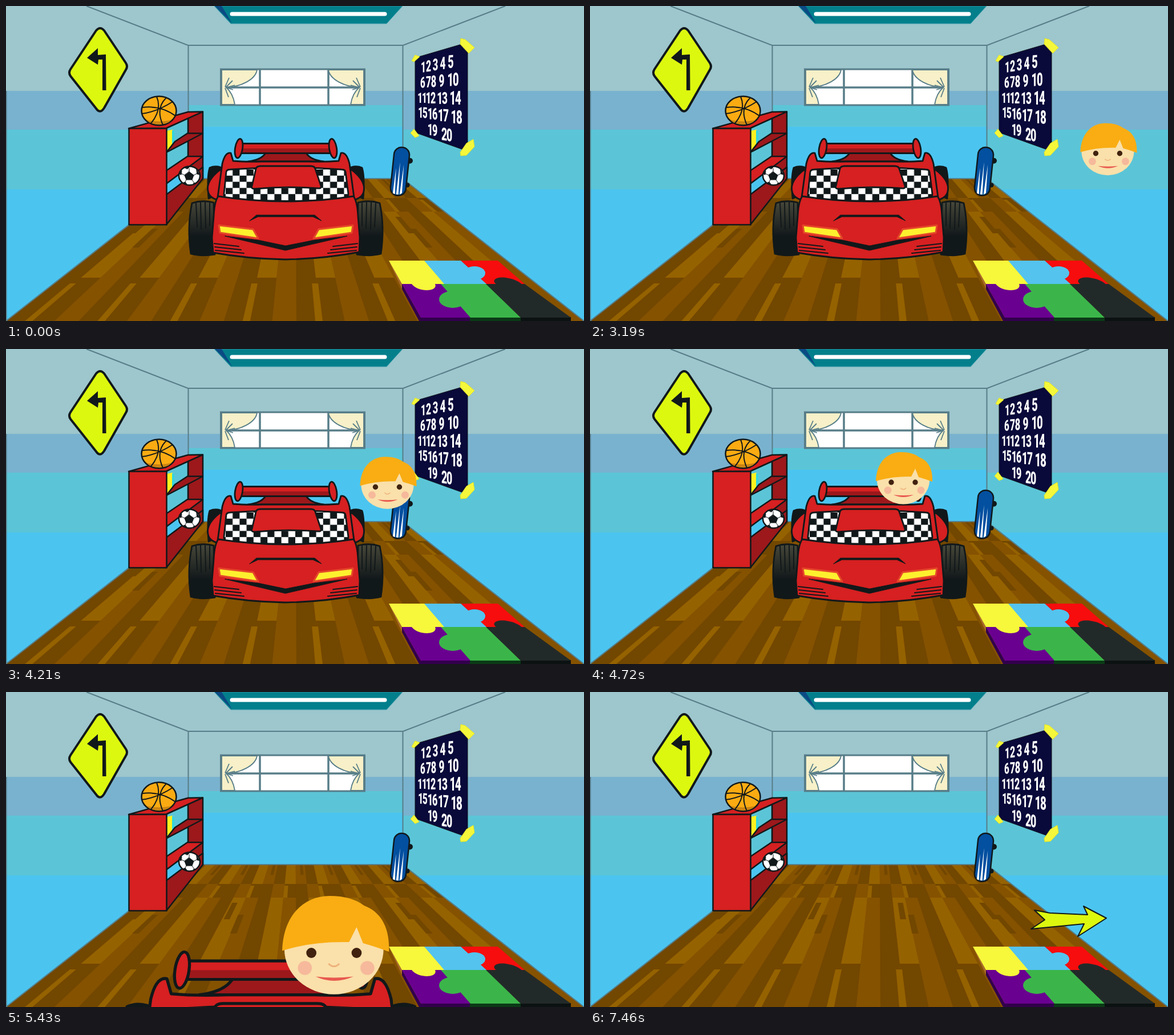
An HTML page for the animation above (8260 ms loop, 1013 px wide and 553 px high).

```html
<!DOCTYPE html>
<html lang="en">
<head>
<meta charset="utf-8">
<title>Garage</title>
<style>
  html, body { margin: 0; width: 100%; height: 100%; overflow: hidden; background: #4bc5f0; }
  svg { display: block; width: 1013px; height: 553px; }
  .ink { stroke: #11181a; stroke-width: 2.5; stroke-linejoin: round; stroke-linecap: round; }
  .edge { fill: none; stroke: #577d88; stroke-width: 2; }
  .none { fill: none; }
  .red { fill: #d62021; }
  .dark { fill: #9c181b; }
  #car { stroke-width: 2.8; }
  #nums { font: 900 31px Roboto, "Liberation Sans", sans-serif; fill: #fff; text-anchor: middle; letter-spacing: -2px; }
</style>
</head>
<body>
<svg viewBox="0 0 1013 553">
  <defs>
    <clipPath id="floorClip"><path d="M0 553L319 303H696L1013 553Z"/></clipPath>
    <pattern id="check" width="24.4" height="21.600" x="385" y="287" patternUnits="userSpaceOnUse">
      <path fill="#fff" d="M0 0h25v22H0z"/>
      <path fill="#11181a" d="M12.200 0h12.200v10.800H12.200zM0 10.800h12.200v10.800H0z"/>
    </pattern>
    <linearGradient id="tyre" x2="0" y2="1">
      <stop offset="0" stop-color="#48483a"/><stop offset=".65" stop-color="#11181a"/>
    </linearGradient>
  </defs>

  <!-- walls -->
  <path fill="#9dc6cd" d="M0 0h1013v149H0z"/>
  <path fill="#79b2cf" d="M0 149h1013v68H0z"/>
  <path fill="#5bc5d7" d="M0 217h1013v105H0zM319 174h377v43H319z"/>
  <path fill="#4bc5f0" d="M0 322h1013v231H0zM319 212h377v110H319z"/>
  <g id="floor" clip-path="url(#floorClip)"><path fill="#855200" d="M0 303h1013v250H0z"/></g>
  <path class="edge" d="M141 0L319 69H696L875 0M319.500 69V303M695.500 69V303H319L0 553M695 303L1013 553M.5 149V553"/>

  <!-- lamp -->
  <path fill="#037f8c" stroke="#3c9da8" d="M365 0H695L667 31H394Z"/>
  <path fill="#0b4a84" d="M366 0h12l18 30z"/>
  <path stroke="#fff" stroke-width="7" stroke-linecap="round" d="M396 14H664"/>

  <!-- window -->
  <path fill="#fff" d="M376 111H629V174H376Z"/>
  <path class="edge" style="stroke-width:3.5" d="M445 111V174M565 111V174M376 143H629"/>
  <g id="curtain" fill="#f7f0c8" stroke="#577d88" stroke-width="1.800">
    <path d="M378 112H440C437 130 410 142 386 143C394 150 399 160 401 173H378Z"/>
    <path class="none" d="M385 143L397 131M384 142L391 126M385 143L398 147M384 144L390 160M386 143L401 139"/>
  </g>
  <use href="#curtain" transform="translate(1005 0) scale(-1 1)"/>
  <path class="edge" style="stroke-width:3" d="M376.500 111H628.500V174H376.500Z"/>

  <!-- road sign -->
  <path class="ink" style="stroke-width:4" fill="#ddf80f" d="M158 43Q165 35 172 43L210 100Q214 106 210 112L172 179Q165 190 158 180L113 123Q109 117 113 111Z"/>
  <path fill="#11181a" d="M169 148H175.500L175 85L161 86V74L142 91L161 103L162 94L169 94Z"/>

  <!-- shelf -->
  <g class="ink">
    <path class="dark" d="M319 188L345 186V303L319 325Z"/>
    <path fill="#5bc5d7" stroke="none" d="M282 214L318 199V290L282 320Z"/>
    <path fill="#4bc5f0" stroke="none" d="M282 311L318 280V303L282 332Z"/>
    <path class="none" d="M319 190V264"/>
    <path fill="#fff21f" stroke="none" d="M282 219L292 217V250L282 256Z"/>
    <path fill="#35d5dc" stroke="none" d="M291 218l4 2v29l-4 2z"/>
    <path class="dark" d="M281 257L296 238L318 223.500H345Z"/>
    <path class="red" d="M281 289L318 264H345L281 312Z"/>
    <path class="dark" d="M281 331L345 283V303L281 384Z"/>
    <path class="red" d="M215 215L319 186L345 185.500L281 214.500Z"/>
    <path class="red" d="M215.500 215H281.500V384H215.500Z"/>
  </g>

  <!-- balls -->
  <g class="ink">
    <ellipse fill="#fbab12" cx="268" cy="184" rx="30.500" ry="25.500"/>
    <path fill="#ca8413" stroke="none" d="M246 200Q268 205 290 200Q283 208 268 208Q253 208 246 200Z"/>
    <path class="none" stroke-width="2" d="M239 178Q272 174 297 193M238 189Q264 186 292 168M264 159Q274 182 254 206M280 162Q262 180 275 209"/>
    <ellipse fill="#fff" cx="321.500" cy="298" rx="18.500" ry="16.500"/>
    <path fill="#11181a" stroke-width="1" d="M321 291l8 6l-3 8h-10l-3-8zM312 283l10-1l-4 4zM334 287l5 9l-4-1zM303 294l5-5l-1 7zM309 311l5-2l4 5zM329 311l6-1l-6 4z"/>
    <path class="none" stroke-width="1" d="M321 291v-6M329 297l6-3M326 305l4 6M316 305l-3 6M313 297l-6-3"/>
  </g>

  <!-- skateboard -->
  <g transform="rotate(6 691 290)">
    <circle cx="706" cy="270" r="5" fill="#11181a"/><circle cx="706" cy="313" r="4" fill="#11181a"/>
    <rect class="ink" fill="#0350a0" x="677" y="248" width="27" height="85" rx="13"/>
    <path fill="#fff" d="M682 330L683 285L686 331ZM688 331L689 274L692 331ZM694 331L696 278L698 328Z"/>
  </g>

  <!-- poster -->
  <path fill="#09093a" stroke="#11181a" d="M717 91L809 64V255L717 222Z"/>
  <g id="nums"></g>
  <path fill="#f5f73a" stroke="#dfe32c" d="M797 57L805 59L821 73L811 83L796 67ZM711 96L717 86L725 89L715 98ZM709 223L715 216L724 228L717 231ZM796 257L807 241L819 234L821 247L807 262L797 263Z"/>

  <!-- puzzle mat -->
  <path fill="#a96a2c" d="M671 447L694 488V497Z"/>
  <path fill="#32004c" d="M694 488L727 547H814V553H724L694 497Z"/>
  <path fill="#0b3a16" d="M813 546H902V553H813Z"/>
  <path fill="#0c1212" d="M902 546H990V553H902Z"/>
  <path fill="#f70d0d" d="M797 447H862L909 488H841Z"/>
  <path fill="#6a0090" d="M694 488H764L814 547H727Z"/>
  <path fill="#3bb54a" d="M762 488H842L902 547H814Z"/>
  <ellipse fill="#3bb54a" cx="783" cy="515" rx="24" ry="15"/>
  <path fill="#222a29" d="M841 488H909L990 547H902Z"/>
  <path fill="#54c3ee" d="M733 447H797L842 488H762Z"/>
  <ellipse fill="#54c3ee" cx="821" cy="469" rx="19" ry="12"/>
  <path fill="#222a29" d="M861 490C848 481 860 475 876 477C891 479 899 484 905 489Z"/>
  <path fill="#f7f73b" d="M671 447H733L768 488H752C758 502 722 503 711 488H694Z"/>

  <!-- car and driver -->
  <g id="ride">
    <g id="car" class="ink">
      <g id="sides">
        <path fill="#11181a" d="M357 284Q366 280 376 283L374 330L355 338Q352 300 357 284Z"/>
        <path class="red" d="M376 287Q350 307 354 325Q356 337 373 341L381 300Z"/>
        <path fill="url(#tyre)" d="M326 346Q344 340 364 345L366 436Q342 440 324 435Q317 388 326 346Z"/>
        <path class="none" stroke-width="2" d="M333 346L335 388M341 345L342 392M349 345L350 390M357 346V386"/>
      </g>
      <use href="#sides" transform="translate(981 0) scale(-1 1)"/>
      <path class="dark" d="M455 258H526Q533 270 557 273H424Q448 270 455 258Z"/>
      <path class="red" d="M413 241.500H568V258.500H413Z"/>
      <path class="dark" stroke="none" d="M414 250H567V257H414Z"/>
      <ellipse class="red" cx="408" cy="250" rx="6.500" ry="17" transform="rotate(9 408 250)"/>
      <ellipse class="red" cx="573" cy="250" rx="6.500" ry="17" transform="rotate(-9 573 250)"/>
      <path class="red" d="M371 336L379 277Q384 256 394 258L398 272Q420 274 450 273H531Q560 274 583 272L587 258Q597 256 602 277L610 336Q490 350 371 336Z"/>
      <path fill="url(#check)" d="M386 291Q387 287 393 287Q490 280 588 287Q594 287 595 291L600 330Q600 337 592 339Q490 346 389 339Q381 337 382 330Z"/>
      <path class="red" d="M438 286Q439 281 446 281H534Q541 281 542 286L552 316Q553 321 546 320Q490 316 436 321Q429 321 431 316Z"/>
      <path class="red" d="M372 334Q430 343 490 343Q550 343 609 334Q616 344 617 370L620 407L619 432Q555 444 490 445Q425 444 363 433L361 407L364 370Q365 344 372 334Z"/>
      <path fill="#11181a" stroke-width="1" d="M427 377L439 367H541L553 377L538 370H442Z"/>
      <path fill="#11181a" style="stroke-width:1" d="M384 404L442 411L490 421L540 411L598 404L490 429Z"/>
      <g id="front">
        <path fill="#fdf02e" style="stroke:#e5482a;stroke-width:3" d="M373 385L433 392L442 408L375 398Z"/>
        <path class="none" style="stroke-width:2" d="M365 417L408 422M366 423L412 428M367 429L417 434"/>
      </g>
      <use href="#front" transform="translate(981 0) scale(-1 1)"/>
    </g>
    <g id="head">
      <ellipse fill="#fae0aa" cx="48" cy="49.500" rx="46" ry="42"/>
      <path fill="#f9ad13" d="M0 51C1 18 20 0 44 0C58 0 68 3 76 9C92 15 100 30 99 52Q86 47 75 44L69 29Q65 37 62 43Q28 42 0 51Z"/>
      <g fill="#f6b99b"><circle cx="21" cy="67" r="6.500"/><circle cx="79" cy="67" r="6.500"/></g>
      <g fill="#40220f"><circle cx="27" cy="53" r="4.700"/><circle cx="69" cy="53" r="4.700"/></g>
      <path class="none" stroke="#eeb27c" stroke-width="1.500" d="M43 63Q48 68 53 63"/>
      <path fill="#e8594f" d="M31 75Q48 77 66 75Q48 83 31 75Z"/>
    </g>
  </g>

  <path id="arrow" class="ink" style="stroke-width:2" fill="#ddf80f" d="M779 383L806 388L872 391L865 376L905 397L855 429L866 407L773 416L797 400Z"/>
</svg>

<script>
const $ = id => document.getElementById(id);
const add = (parent, tag, attrs, text = '') => {
  const el = document.createElementNS('http://www.w3.org/2000/svg', tag);
  for (const k in attrs) el.setAttribute(k, attrs[k]);
  el.textContent = text;
  parent.append(el);
};

// Floorboards run along rays from the vanishing point; u is the offset at the front edge.
const BASE = '#855200', DARK = '#724700', LIGHT = '#956200', W = 42.4;
const px = (u, y) => (507 + u * (y - 156) / 397).toFixed(1);
function board(u, w, y1, y2, fill) {
  add($('floor'), 'path', { fill,
    d: `M${px(u, y1)} ${y1}L${px(u + w, y1)} ${y1}L${px(u + w, y2)} ${y2}L${px(u, y2)} ${y2}Z` });
}
const rows = [
  [303, 337, [BASE, DARK, LIGHT]],
  [337, 361, [DARK, BASE, DARK]],
  [361, 477, [DARK, LIGHT, BASE]],
  [477, 553, [DARK, DARK, BASE]]
];
for (const [y1, y2, tones] of rows)
  for (let i = -15; i < 15; i++) board(i * W + 2, W, y1, y2, tones[(i + 15) % 3]);
for (let k = -5; k < 6; k++) {
  const u = k * 3 * W;
  board(u + 22, 13, 303, 321, DARK);
  board(u - 41, 14, 340, 361, LIGHT);
  board(u + 35, 13, 487, 553, LIGHT);
  if (k % 2) board(u - 42, 17, 391, 424, DARK);
}
for (const u of [-475, -205, 60, 325]) board(u, 17, 370, 399, DARK);

// Poster rows: first number, height at x = 731, slope, centres.
const poster = [
  [1, 107, -.2, [731, 740, 752, 765, 779]],
  [6, 134, -.1, [730, 740, 749, 763, 783]],
  [11, 161, 0, [729, 744, 764, 787]],
  [15, 187, .13, [730, 747, 766, 789]],
  [19, 212, .33, [747, 772]]
];
for (const [first, y, slope, xs] of poster)
  xs.forEach((x, i) => {
    const s = .85 + (x - 729) / 290;
    add($('nums'), 'text', {
      y: 11,
      transform: `matrix(${.57 * s} ${slope * .3} 0 ${s} ${x} ${y + (x - 731) * slope})`
    }, first + i);
  });

const LOOP = 8260, STEP = 30;
// Progress in whole steps; the first step already shows some movement.
const part = (t, from, steps) =>
  t < from ? 0 : Math.min(1, (Math.floor((t - from) / STEP) + 1) / steps);

function draw(t) {
  const walk = part(t, 2560, 73);
  $('head').setAttribute('transform', `translate(${1014 - 513 * walk} ${216.5 - 35.5 * walk})`);
  $('head').style.display = t < 2560 ? 'none' : '';

  const leave = part(t, 4980, 18), s = 1 + leave;
  $('ride').style.display = leave < 1 ? '' : 'none';
  $('ride').setAttribute('transform',
    `translate(${490 - 30 * leave} ${313 + 331 * leave}) scale(${s}) translate(-490 -313)`);

  const show = part(t, 6590, 30), rest = (1 - show) ** 2;
  $('arrow').style.opacity = show;
  $('arrow').setAttribute('transform',
    `translate(825 402) scale(${1 + .5 * rest} ${1 + .35 * rest}) translate(-825 -402)`);
}

const start = performance.now();
function frame() {
  draw((performance.now() - start) % LOOP);
  requestAnimationFrame(frame);
}
frame();
</script>
</body>
</html>
```
